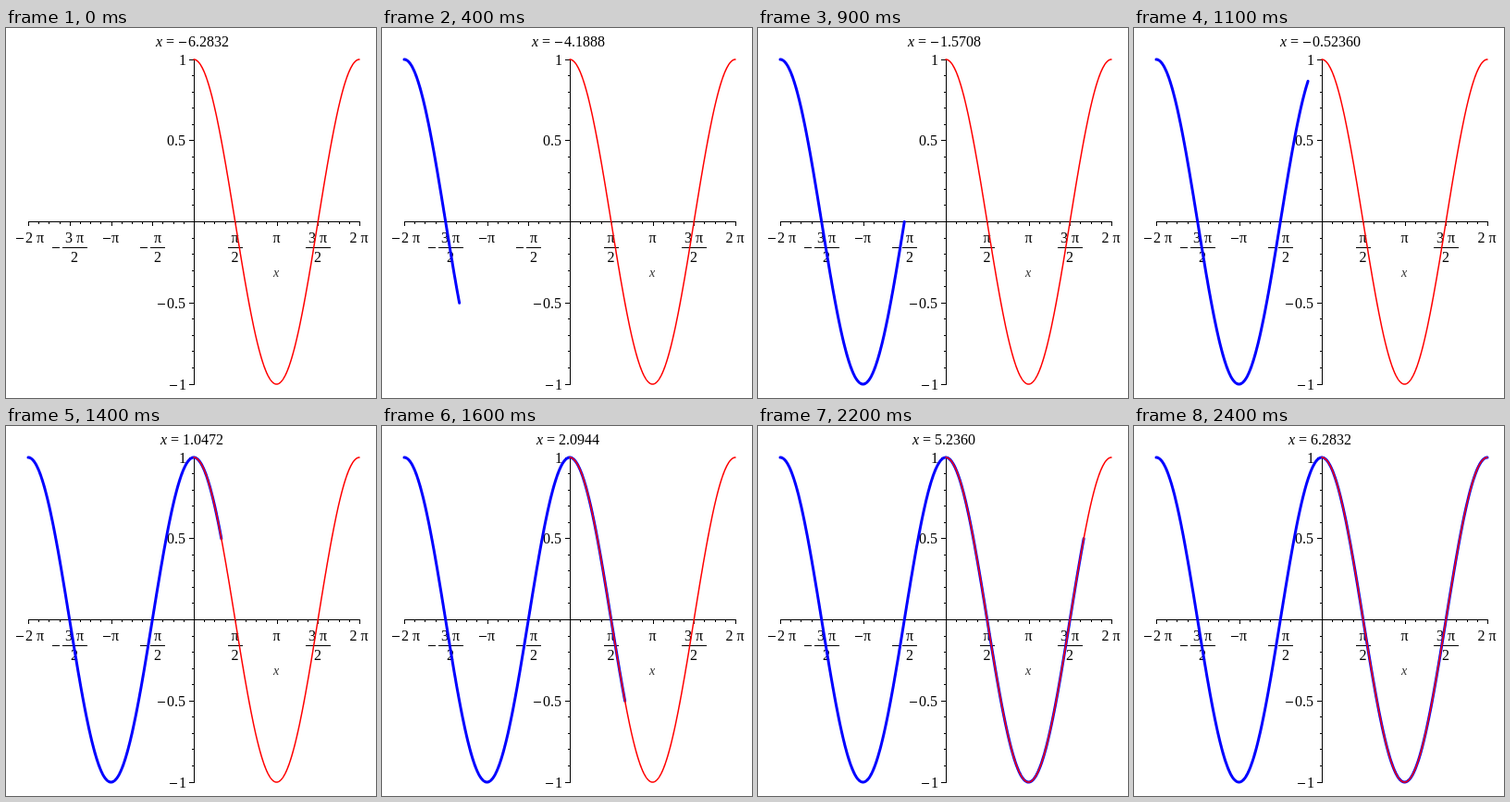
An HTML page with a canvas for the animation above (2500 ms loop, 400 by 400 pixels).

```html
<!DOCTYPE html>
<html>
<head>
<meta charset="utf-8">
<style>
html, body { margin: 0; width: 400px; height: 400px; overflow: hidden; background: #fff; }
canvas { display: block; }
</style>
</head>
<body>
<canvas id="plot" width="400" height="400"></canvas>
<script>
const ctx = document.getElementById('plot').getContext('2d');
const PI = Math.PI, CX = 203, CY = 209.5, AMP = 175.5, UNIT = 179 / (2 * PI);
const SERIF = '"Liberation Serif", "Times New Roman", serif';

function text(str, x, y, align = 'left', style = '16px') {
  ctx.font = style + ' ' + SERIF;
  ctx.textAlign = align;
  ctx.fillText(str, x, y);
}

function minus(x, y) {
  ctx.fillRect(x, y, 8, 1);
}

function fraction(top, x, width, negative) {
  text(top, x, 232, 'center');
  text('2', x, 253, 'center');
  ctx.fillRect(Math.round(x - width / 2), 237, width, 1);
  if (negative) minus(Math.round(x - width / 2) - 11, 237);
}

function axes() {
  ctx.fillStyle = '#000';
  ctx.fillRect(24, 209, 359, 1);
  ctx.fillRect(203, 34, 1, 352);
  for (let i = -16; i <= 16; i++) {
    ctx.fillRect(Math.round(CX + i * 179 / 16), 210, 1, i % 4 ? 2 : 4);
  }
  for (let i = -10; i <= 10; i++) {
    const len = i % 5 ? 2 : 5;
    ctx.fillRect(203 - len, Math.round(CY - 0.5 - i * AMP / 10), len, 1);
  }

  text('1', 195, 40, 'right');
  text('0.5', 194, 127, 'right');
  text('0.5', 194, 303, 'right');
  minus(164, 298);
  text('1', 195, 391, 'right');
  minus(177, 386);

  minus(11, 227);
  text('2 π', 21, 232);
  fraction('3 π', 74, 27, true);
  minus(105, 227);
  text('π', 118, 232, 'center');
  fraction('π', 164, 16, true);
  fraction('π', 247.5, 16);
  text('π', 292.5, 232, 'center');
  fraction('3 π', 337, 27);
  text('2 π', 381.5, 232, 'center');
  ctx.fillStyle = '#333';
  text('x', 292, 269, 'center', 'italic 14px');
}

function title(x) {
  const digits = x ? Math.abs(x).toPrecision(5) : '0.';
  const offset = x < 0 ? 35 : 24;
  const left = Math.round(201 - (offset + 8 * digits.length - 4) / 2);
  ctx.fillStyle = '#000';
  text('x', left, 20, 'left', 'italic 16px');
  text('=', left + 11, 20);
  if (x < 0) minus(left + 25, 15);
  text(digits, left + offset, 20);
}

function cosine(from, to, color, width) {
  if (to <= from) return;
  const steps = Math.ceil((to - from) * 40);
  ctx.beginPath();
  for (let i = 0; i <= steps; i++) {
    const x = from + (to - from) * i / steps;
    ctx.lineTo(CX + x * UNIT, CY - AMP * Math.cos(x));
  }
  ctx.strokeStyle = color;
  ctx.lineWidth = width;
  ctx.lineCap = ctx.lineJoin = 'round';
  ctx.stroke();
}

function draw() {
  const step = Math.floor(performance.now() % 2500 / 100);
  const x = (step - 12) * PI / 6;
  ctx.fillStyle = '#fff';
  ctx.fillRect(0, 0, 400, 400);
  axes();
  title(x);
  cosine(-2 * PI, x, '#00f', 3);
  cosine(0, 2 * PI, '#f00', 1.5);
  requestAnimationFrame(draw);
}
draw();
</script>
</body>
</html>
```
